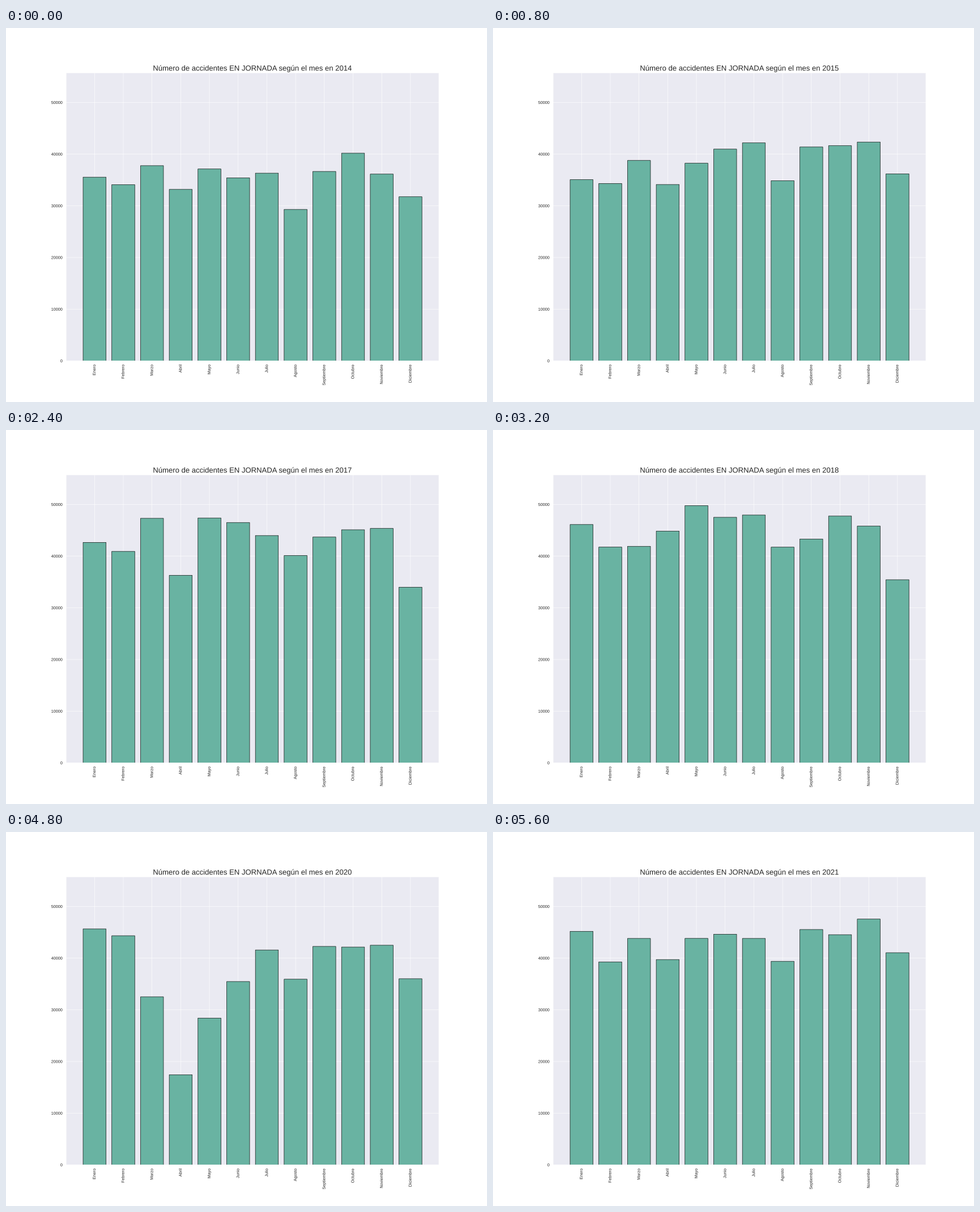
These frames come from a looping animation (849 by 660 pixels, 6400 ms). A matplotlib script:

```python
import matplotlib.pyplot as plt
import numpy as np
from matplotlib import patheffects
from matplotlib.animation import FuncAnimation

W, H = 849, 660
DPI = W / 18
INK = "#262626"

MONTHS = ["Enero", "Febrero", "Marzo", "Abril", "Mayo", "Junio", "Julio",
          "Agosto", "Septiembre", "Octubre", "Noviembre", "Diciembre"]
YEARS = range(2014, 2022)
HOLIDAYS = ["01-01", "01-06", "05-01", "08-15", "10-12", "11-01",
            "12-06", "12-08", "12-25"]

# Trend of accidents per day: (months since January 2014, thousands)
TREND = [(0, 1.6), (2, 1.7), (6, 1.52), (9, 1.64), (12, 1.64), (24, 1.89),
         (35, 1.86), (37, 1.98), (47, 1.98), (53, 2.1), (59, 1.98),
         (60, 2.11), (68, 2.23), (71, 1.98), (73, 2.13), (74, 1.41),
         (75, 0.87), (76, 1.28), (78, 1.74), (79, 1.84), (83, 1.86),
         (84, 2.2), (85, 1.9), (90, 1.9), (95, 2.12)]


def easter(year):
    d = (19 * (year % 19) + 24) % 30
    e = (2 * (year % 4) + 4 * (year % 7) + 6 * d + 5) % 7
    return np.datetime64(f"{year}-03-22") + int(d + e)


def day_load(year):
    """Days of each month, with weekends and holidays counting little."""
    start = np.datetime64(f"{year}-01") + np.arange(13)
    start = start.astype("datetime64[D]")
    free = [np.datetime64(f"{year}-{day}") for day in HOLIDAYS]
    free += [easter(year) + shift for shift in (-4, -3, -2, 1)]
    work = np.busday_count(start[:-1], start[1:], holidays=free)
    return 0.85 * work + 0.15 * np.diff(start).astype(int)


def accidents(year):
    month = np.arange(12)
    season = 1 + 0.025 * np.cos(2 * np.pi * (month - 4) / 6)
    season[7] *= 0.89   # summer break
    season[11] *= 0.85  # end of year
    rate = np.interp(month + 12 * (year - YEARS[0]), *zip(*TREND))
    return 1000 * rate * season * day_load(year)


plt.rcParams.update({
    "font.family": "Liberation Sans",
    "text.hinting": "none",
    "text.color": INK,
    "axes.axisbelow": True,
})

fig = plt.figure(figsize=(W / DPI, H / DPI), dpi=DPI, facecolor="white")
ax = fig.add_axes([0.125, 0.11, 0.775, 0.77], facecolor="#EAEAF2")
ax.grid(color="white", linewidth=1, snap=False)
for spine in ax.spines.values():
    spine.set(color="white", linewidth=1.25, snap=False)

bars = ax.bar(range(12), [0] * 12, width=0.8, color="#69b3a2",
              edgecolor="black", linewidth=1, snap=False)
title = ax.set_title("", fontsize=20, pad=6)

ax.set_xlim(-0.99, 11.99)
ax.set_ylim(0, 55723)
ax.set_xticks(range(12), MONTHS, rotation=90)
ax.set_yticks(range(0, 50001, 10000))
ax.tick_params(length=6, pad=3.5, bottom=False, left=False,
               labelsize=11, labelcolor=INK)

# Outlined text keeps its exact sub-pixel place
for text in [title, *ax.get_xticklabels(), *ax.get_yticklabels()]:
    text.set_path_effects([patheffects.Normal()])


def draw(i):
    year = YEARS[i]
    for bar, value in zip(bars, accidents(year)):
        bar.set_height(value)
    title.set_text(f"Número de accidentes EN JORNADA según el mes en {year}")
    return [*bars, title]


anim = FuncAnimation(fig, draw, frames=len(YEARS), interval=800,
                     repeat=True, repeat_delay=0, blit=False)
plt.show()
```
